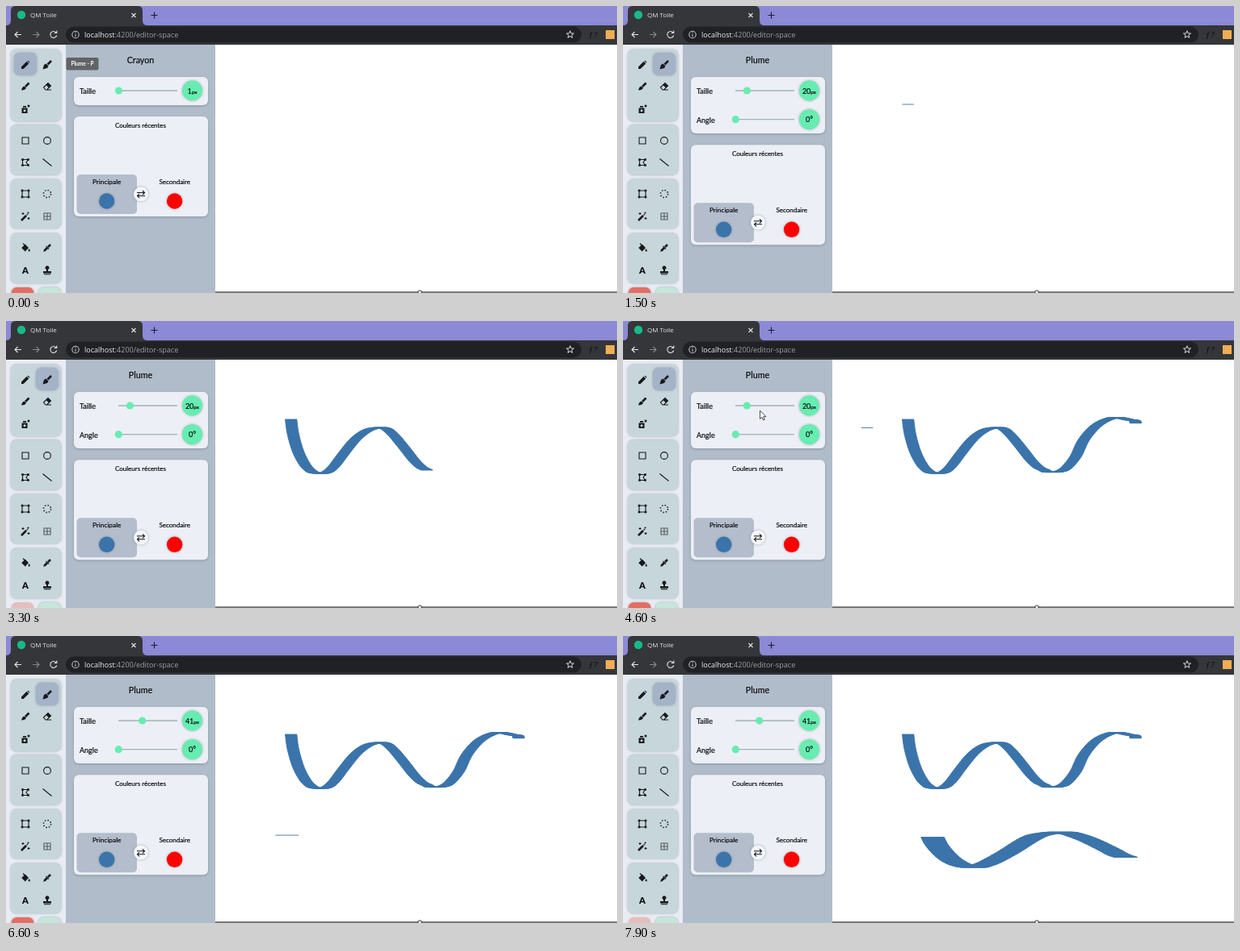
An HTML page for the animation above (8000 ms loop, 756 by 356 pixels).

```html
<!DOCTYPE html>
<html lang="fr">
<head>
<meta charset="utf-8">
<title>QM Toile</title>
<style>
  html, body { margin: 0; width: 100%; height: 100%; overflow: hidden; background: #fff; }
  svg { display: block; }
  text { font-family: Lato, sans-serif; font-size: 8px; fill: #0b0d10; }
  .ui text { stroke: #0b0d10; stroke-width: .2px; }
  .mid { text-anchor: middle; }
  .web text, text.web { font-family: "Open Sans", sans-serif; stroke: none; }
  .soft { filter: drop-shadow(0 0 1.5px #5a6b7c88); }
  .card { fill: #eceff5; filter: drop-shadow(0 1px 1.5px #4a5a6a66); }
  .line { fill: none; stroke: #17191c; stroke-width: 1.1; }
  .thick { stroke-width: 2.6; }
  .ink { fill: #3b74ab; stroke: #3b74ab; stroke-width: .9; }
  .mint { fill: #66edb0; }
</style>
</head>
<body>
<svg width="756" height="356" viewBox="0 0 756 356">
  <rect width="756" height="356" fill="#fff"/>
  <path class="ink" id="stroke1"/>
  <path class="ink" id="stroke2"/>
  <path class="ink" id="nib"/>
  <path d="M259 355H756" stroke="#4b4b4b" stroke-width="1.4"/>
  <rect x="510" y="353" width="4" height="4" rx="1" fill="#fff" stroke="#333"/>

  <g class="web">
    <rect width="756" height="25" fill="#8c89d6"/>
    <path d="M0 24Q6 24 6 18V6Q6 0 12 0H163Q169 0 169 6V18Q169 24 175 24H756V48H0Z" fill="#35363a"/>
    <circle cx="19" cy="11" r="5.2" fill="#17b98a"/>
    <text x="30" y="14" style="fill:#e3e4e6">QM Toile</text>
    <path d="M155.500 9l5 5m0-5l-5 5" class="line" style="stroke:#e3e4e6"/>
    <path d="M179.500 11.500h8m-4-4v8" class="line" style="stroke:#1d1c2c"/>
    <path d="M19 35.500H11m3.500-3.500L11 35.500l3.500 3.500" class="line" style="stroke:#e3e4e6"/>
    <path d="M33 35.500h8m-3.500-3.500l3.500 3.500l-3.500 3.500" class="line" style="stroke:#85878b"/>
    <path d="M62 33a4 4 0 1 0 .700 3.500M62.800 30.500v3h-3" class="line" style="stroke:#e3e4e6"/>
    <rect x="74" y="25.500" width="638" height="20" rx="10" fill="#202124"/>
    <circle cx="86" cy="35.500" r="4.200" class="line" style="stroke:#c2c4c8"/>
    <path d="M86 35v3m0-5.200v1.200" class="line" style="stroke:#c2c4c8"/>
    <text x="97" y="39" style="font-size:9px;fill:#9aa0a6"><tspan fill="#eceded">localhost</tspan>:4200/editor-space</text>
    <path id="star" class="line" style="stroke:#d5d6d9;stroke-width:1"/>
    <text x="721" y="39" style="font:italic 11px 'Liberation Serif',serif;fill:#0d0d0e">ƒ?</text>
    <rect x="742" y="30" width="11" height="11" fill="#f0ad55"/>
  </g>

  <g id="tools">
    <rect y="48" width="75" height="308" fill="#e9edf3"/>
  </g>

  <g class="ui">
    <rect x="74" y="48" width="185" height="308" fill="#b0bcc9"/>
    <text id="title" class="mid" x="166.500" y="71" style="font-size:10.700px"></text>
    <rect id="card" class="card" x="84" y="88" width="166" rx="6"/>
    <g id="size"></g>
    <g id="angle"></g>
    <g id="colors">
      <rect class="card" x="84" y="137" width="166" height="124" rx="6"/>
      <text class="mid" x="166.500" y="151">Couleurs récentes</text>
      <rect x="87.500" y="209" width="74.500" height="49" rx="5" fill="#b4bdcc"/>
      <text class="mid" x="124.700" y="221" style="font-size:8.300px">Principale</text>
      <text class="mid" x="208.700" y="221">Secondaire</text>
      <circle class="soft" cx="124.700" cy="242" r="9.700" fill="#3b74ab"/>
      <circle class="soft" cx="208.600" cy="242" r="9.700" fill="#f00"/>
      <circle class="soft" cx="167" cy="233.300" r="9" fill="#f4f6f9"/>
      <path class="line" d="M162 231.500h9.500m-2.500-2.500l2.500 2.500l-2.500 2.500M172 235.500h-9.500m2.500-2.500l-2.500 2.500l2.500 2.500"/>
    </g>
  </g>

  <g id="bubble">
    <path class="mint" d="M0 0L-6.700-7.500A9.300 9.300 0 1 1 6.700-7.500Z"/>
    <text class="mid" y="-11" style="font-size:7.500px"></text>
  </g>
  <g id="tip">
    <rect x="74.500" y="64" width="40" height="15.500" rx="2" fill="#616467"/>
    <text class="mid" x="94.500" y="74" style="font-size:6.600px;font-weight:700;fill:#fff">Plume - P</text>
  </g>
  <path id="arrow" d="M0 0V10.500L2.500 8.300L4 12L5.800 11.200L4.200 7.700H7.500Z" fill="#fff" stroke="#222" stroke-width=".8"/>
</svg>

<script>
const LOOP = 8000, PEN_ON = 600;
const $ = id => document.getElementById(id);
const show = (id, on) => $(id).style.opacity = +on;
const within = (t, a, b) => t >= a && t < b;

// Linear interpolation through [time, value] pairs
function track(t, keys) {
  if (t <= keys[0][0]) return keys[0][1];
  for (let i = 1; i < keys.length; i++) {
    const [a, u] = keys[i - 1], [b, v] = keys[i];
    if (t <= b) return u + (v - u) * (t - a) / (b - a);
  }
  return keys[keys.length - 1][1];
}
const ease = k => k * k * (3 - 2 * k);
const glide = (t, a, b, from, to) => from + (to - from) * ease(track(t, [[a, 0], [b, 1]]));

// Toolbox: icons are drawn around their own centre
const line = (d, more = '') => `<path class="line ${more}" d="${d}"/>`;
const solid = d => `<path d="${d}" fill="#17191c"/>`;
const dot = (x, y) => solid(`M${x - 1.3} ${y - 1.3}h2.600v2.600h-2.600z`);
const corners = dot(-4, -4) + dot(4, -4) + dot(-4, 4) + dot(4, 4);
const icons = [
  [24, 73, solid('M-5 5V2.400L1.600-4.200L4.200-1.600L-2.400 5ZM2.300-4.900L3.500-5.300L5.300-3.500L4.900-2.300Z')],
  [51, 73, line('M5-5L.500-.500', 'thick') + solid('M-1.500-1.500L1.500 1.500L0 4L-5.500 5.500L-4 0Z')],
  [24, 100, line('M4.500-4.500L0 0', 'thick') + solid('M-1.500-.500Q-4 0-5 4.500Q0 4.500 1 1.500Z')],
  [51, 100, line('M-4.500 1L1-4.500L4.500-1L-.500 4H-2ZM-2 4H5') + solid('M-1.500-2L1-4.500L4.500-1L2 1.500Z')],
  [24, 128, solid('M-4.500-1.500H2.500V5H-4.500ZM-3-4H1V-2.300H-3Z') + dot(4, -4) +
    '<circle cx="-1" cy="1.700" r="1.500" fill="#c7d6da"/>'],
  [24, 167, line('M-4-4H4V4H-4Z')],
  [51, 167, line('M-4.400 0a4.400 4.400 0 1 0 8.800 0a4.400 4.400 0 1 0-8.800 0')],
  [24, 194, line('M-3.500-3.500H3.500L1 0L3.500 3.500H-3.500Z') + dot(-3.5, -3.5) + dot(3.5, -3.5) + dot(-3.5, 3.5) + dot(3.5, 3.5)],
  [51, 194, line('M-5.500-4.500L5.500 4.500')],
  [24, 233, line('M-4-4H4V4H-4Z') + corners],
  [51, 233, '<circle r="4.600" class="line" style="stroke-width:1.500" stroke-dasharray="1.500 2.110"/>'],
  [24, 261, line('M-5 5L1-1', 'thick') + line('M1.500-1.500L3-3M-3-5v3m-1.500-1.500h3M4 1v3m-1.500-1.500h3M3.500-5.500v2m-1-1h2')],
  [51, 261, '<g opacity=".65">' + line('M-4-4H4V4H-4ZM0-4V4M-4 0H4') + '</g>'],
  [24, 300, solid('M-4.800 0L-.300-4.500L4 0L-.300 4.500ZM4.700 1Q7 4.500 4.700 4.500T4.700 1') + line('M-3-5.500L1-1.500')],
  [51, 300, line('M1-1L4-4', 'thick') + line('M-1.500-2L2 1.500M.500-.500L-4.500 4.500', '') + line('M0 0L-3.500 3.500', 'thick')],
  [24, 328, '<text class="mid" y="4" style="font-size:11px;font-weight:900">A</text>'],
  [51, 328, solid('M-5 1H5V3.500H-5ZM-4 4.200H4V5.300H-4ZM-1 1.500V-1A2.500 2.500 0 1 1 1-1V1.500Z')]
];
$('tools').innerHTML +=
  [[54, 89], [147.500, 62], [215, 61], [282, 62]].map(([y, h]) =>
    `<rect class="soft" x="6" y="${y}" width="62" height="${h}" rx="7" fill="#c7d6da"/>`).join('') +
  '<rect id="undo" class="soft" x="6.500" y="349" width="28" height="28" rx="7" fill="#e46d64"/>' +
  '<rect class="soft" x="40" y="349" width="28" height="28" rx="7" fill="#c5e6da"/>' +
  '<rect id="pick" class="soft" y="58" width="28" height="28" rx="7" fill="#a5b3c9"/>' +
  icons.map(([x, y, art]) => `<g transform="translate(${x} ${y})">${art}</g>`).join('');

// Sliders
function slider(id, label, y, unit) {
  $(id).innerHTML = `<text x="91" y="${y + 4}" style="font-size:9px">${label}</text>
    <path d="M139 ${y}H212" stroke="#a5b0ba" stroke-width="1.300"/>
    <circle class="mint" cx="139.300" cy="${y}" r="4.600"/>
    <circle class="mint soft" cx="230.500" cy="${y}" r="12.500"/>
    <text class="mid" x="230.500" y="${y + 3.5}" style="font-size:9px"><tspan>0</tspan>${unit}</text>`;
}
slider('size', 'Taille', 105, '<tspan style="font-size:6.500px">px</tspan>');
slider('angle', 'Angle', 140.7, '°');
const [rail, thumb] = $('size').querySelectorAll('path, circle');
const sizeText = $('size').querySelector('tspan');
const bubbleText = $('bubble').querySelector('text');

$('star').setAttribute('d', 'M' + Array.from({ length: 10 }, (_, i) => {
  const r = i % 2 ? 2 : 4.8, a = i * Math.PI / 5;
  return `${698 + r * Math.sin(a)} ${35.5 - r * Math.cos(a)}`;
}).join('L') + 'Z');

// Catmull-Rom samples through the left end of the nib
function curve(pts, steps = 5) {
  const out = [];
  for (let i = 0; i < pts.length - 1; i++) {
    const p = [pts[i - 1] || pts[i], pts[i], pts[i + 1], pts[i + 2] || pts[i + 1]];
    for (let s = 0; s < steps; s++) {
      const k = s / steps;
      out.push([0, 1].map(c => {
        const [a, b, d, e] = p.map(q => q[c]);
        return b + .5 * k * (d - a + k * (2 * a - 5 * b + 4 * d - e + k * (3 * (b - d) + e - a)));
      }));
    }
  }
  return out.concat([pts[pts.length - 1]]);
}
const wave1 = curve([[345.5, 122], [348, 140], [354, 161], [362, 177], [369, 185], [376, 188.5], [388, 188.3],
  [398, 181], [411, 164], [424, 148], [436, 138], [447, 133.3], [461, 132.7], [472, 141], [485, 156.5],
  [498, 173], [507, 181.5], [513.5, 184.7], [519, 187.3], [531, 187], [541, 182.5], [553, 168], [561.5, 150],
  [572, 136], [582.5, 127], [594, 121.5], [603, 119.6], [611, 120.7], [619, 122.5], [626, 123.7], [627, 126.7]]);
const wave2 = curve([[368.7, 249.5], [374, 259.5], [384, 271], [394, 279], [406, 284.5], [420, 287], [432, 283.7],
  [443, 279], [464, 267.3], [480, 257], [496, 248.3], [512, 244.7], [528, 243.3], [541, 245.5], [561, 252.5],
  [585, 264], [598, 271], [608, 274.5]]);

// Area swept by a horizontal nib, up to x = end
function sweep(pts, end, w) {
  let d = '';
  for (let i = 1; i < pts.length && pts[i - 1][0] < end; i++) {
    let a = pts[i - 1], b = pts[i];
    if (b[0] > end) {
      const k = (end - a[0]) / (b[0] - a[0]);
      b = [end, a[1] + (b[1] - a[1]) * k];
    }
    if (a[1] > b[1]) [a, b] = [b, a];   // same winding for every piece
    d += `M${a}h${w}L${b[0] + w} ${b[1]}h${-w}Z`;
  }
  return d;
}

function draw(t) {
  const pen = t >= PEN_ON;
  const size = pen ? Math.round(glide(t, 5250, 5550, 20, 41)) : 1;
  const thumbX = 138.8 + .729 * size;

  $('title').textContent = pen ? 'Plume' : 'Crayon';
  $('pick').setAttribute('x', pen ? 37 : 10);
  $('card').setAttribute('height', pen ? 70 : 35);
  $('colors').setAttribute('transform', `translate(0 ${pen ? 35.3 : 0})`);
  show('angle', pen);
  show('tip', t < PEN_ON + 100);
  show('undo', within(t, 2000, 4050) || t >= 6700 ? .38 : 1);

  const pop = track(t, [[5200, 0], [5350, 1], [5850, 1], [6000, 0]]);
  sizeText.textContent = bubbleText.textContent = size;
  thumb.setAttribute('cx', thumbX);
  thumb.setAttribute('r', 4.6 * (1 - pop));
  rail.setAttribute('stroke', pop > .5 ? '#f5f7fa' : '#a5b0ba');
  $('bubble').setAttribute('transform', `translate(${thumbX} ${105 - 3 * pop}) scale(${pop})`);

  $('stroke1').setAttribute('d', t < 2000 ? '' : sweep(wave1,
    track(t, [[2000, 345.5], [2700, 455], [3300, 513.5], [3600, 547], [4000, 627.1]]), 14.3));
  $('stroke2').setAttribute('d', t < 6700 ? '' : sweep(wave2,
    track(t, [[6700, 368.7], [7200, 464], [7900, 608], [8000, 609]]), 28.7));

  // Nib preview before and after each stroke
  let nib = '';
  if (within(t, 1000, 2050)) nib = `M${glide(t, 1000, 1400, 245, 345.5)} ${glide(t, 1000, 1400, 138, 122)}h14.300`;
  if (within(t, 4050, 4800)) nib = `M${glide(t, 4000, 4500, 627, 295)} ${glide(t, 4000, 4500, 126.700, 132.500)}h14.300`;
  if (within(t, 6400, 6750)) nib = `M${glide(t, 6400, 6700, 230, 368.700)} ${glide(t, 6400, 6700, 240, 249.500)}h28.700`;
  $('nib').setAttribute('d', nib);

  show('arrow', within(t, 4550, 5200));
  $('arrow').setAttribute('transform',
    `translate(${glide(t, 4650, 5000, 169.500, 153.500)} ${glide(t, 4650, 5000, 111, 104)})`);
}

function tick(now) {
  draw(now % LOOP);
  requestAnimationFrame(tick);
}
draw(0);
requestAnimationFrame(tick);
</script>
</body>
</html>
```
